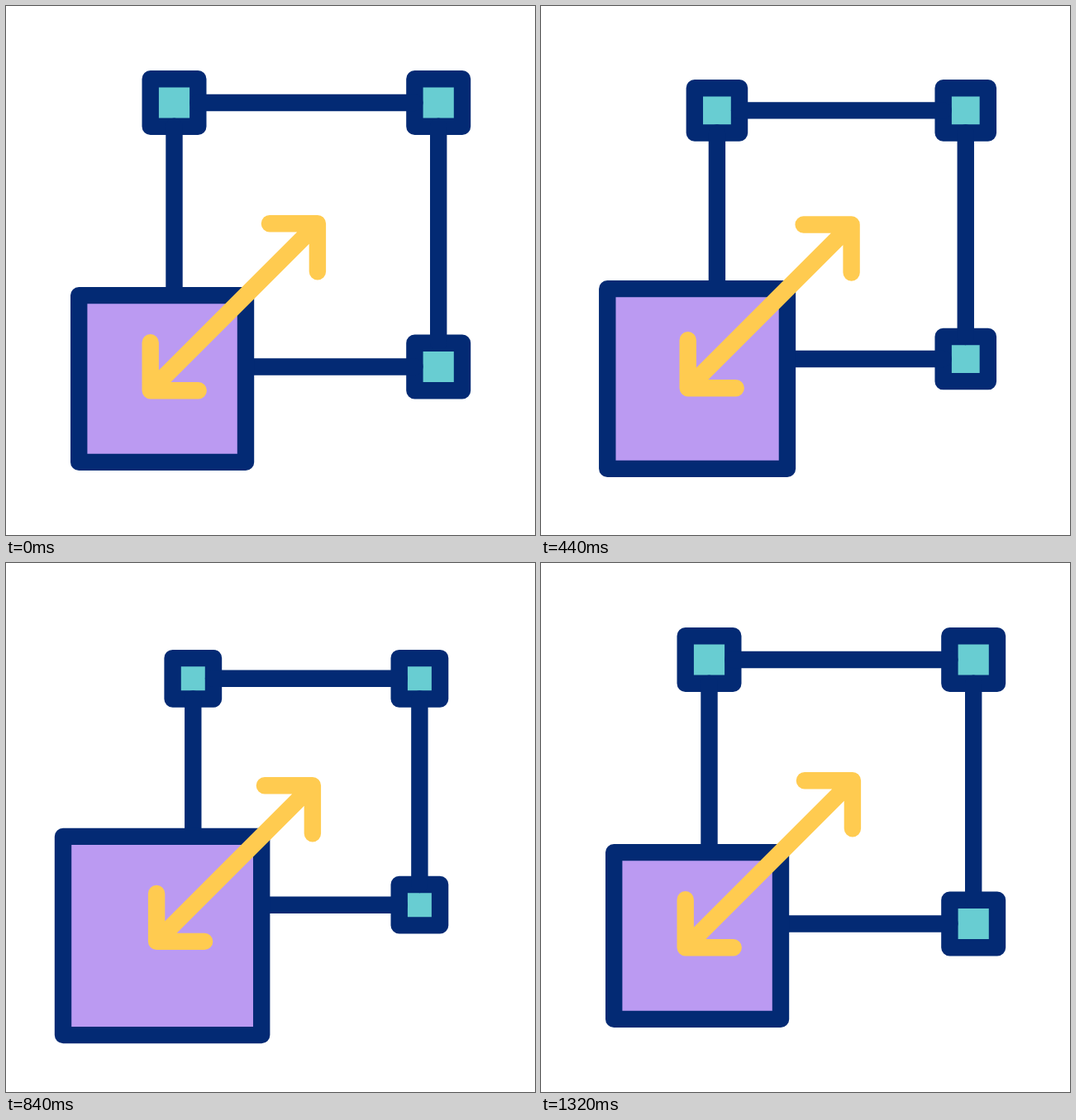
These frames come from a looping animation (640 by 640 pixels, 1.4 s). An HTML page:

```html
<!DOCTYPE html>
<html lang="en">
<head>
<meta charset="utf-8">
<title>Resize icon</title>
<style>
  html, body { margin: 0; width: 100%; height: 100%; overflow: hidden; background: #fff; }
  svg { display: block; fill: none; stroke: #032a74; stroke-width: 20.4; stroke-linecap: round; stroke-linejoin: round; }
  path, rect { vector-effect: non-scaling-stroke; }
  #handles { fill: #68cdd2; }
  #square { fill: #bb9af2; }
  #arrow { stroke: #ffcb50; }
</style>
</head>
<body>
<svg width="640" height="640">
  <g id="frame">
    <g id="handles">
      <rect x="174.7" y="88.2" width="57.6" height="57.6"/>
      <rect x="494.4" y="88.2" width="57.6" height="57.6"/>
      <rect x="494.4" y="407.7" width="57.6" height="57.6"/>
    </g>
    <path d="M232.3 117H494.4M523.2 145.8V407.7M494.4 436.5H290M203.5 145.8V350"/>
  </g>
  <rect id="square" x="88.2" y="350.1" width="201.8" height="201.8"/>
  <path id="arrow"/>
</svg>
<script>
const LOOP = 1400, STEP = 40;
const [frame, square, arrow] = ['frame', 'square', 'arrow'].map(id => document.getElementById(id));

const easeCubic = u => u < .5 ? 4 * u ** 3 : 1 - 4 * (1 - u) ** 3;
const easeSmooth = u => u * u * (3 - 2 * u);
const clamp = u => Math.min(1, Math.max(0, u));

// Offsets of the arrow tips along the diagonal, one key every 240 ms from 80 ms
const upperKeys = [0, -20.2, 17.6, -6.5, 0];
const lowerKeys = [0, -23.4, 17.4, -8, 0];

function keyed(keys, t) {
  const pos = clamp((t - 80) / 960) * (keys.length - 1);
  const i = Math.min(Math.floor(pos), keys.length - 2);
  return keys[i] + (keys[i + 1] - keys[i]) * easeSmooth(pos - i);
}

function scaleAbout(el, x, y, s) {
  el.setAttribute('transform', `translate(${x} ${y}) scale(${s}) translate(${-x} ${-y})`);
}

function draw(t) {
  const grow = easeCubic(clamp((t - 200) / 520)) - easeCubic(clamp((t - 720) / 520));
  scaleAbout(frame, 363.3, 276.7, 1 - .15 * grow);
  scaleAbout(square, 189.1, 451, 1 + .2 * grow);

  const up = keyed(upperKeys, t), low = keyed(lowerKeys, t);
  const x1 = 376.9 + up, y1 = 263.2 - up, x2 = 174.7 - low, y2 = 465.3 + low;
  arrow.setAttribute('d',
    `M${x1} ${y1}L${x2} ${y2}M${x1 - 58} ${y1}h58v58M${x2} ${y2 - 58}v58h58`);
}

function tick() {
  draw(Math.floor(performance.now() % LOOP / STEP) * STEP);
  requestAnimationFrame(tick);
}
tick();
</script>
</body>
</html>
```
